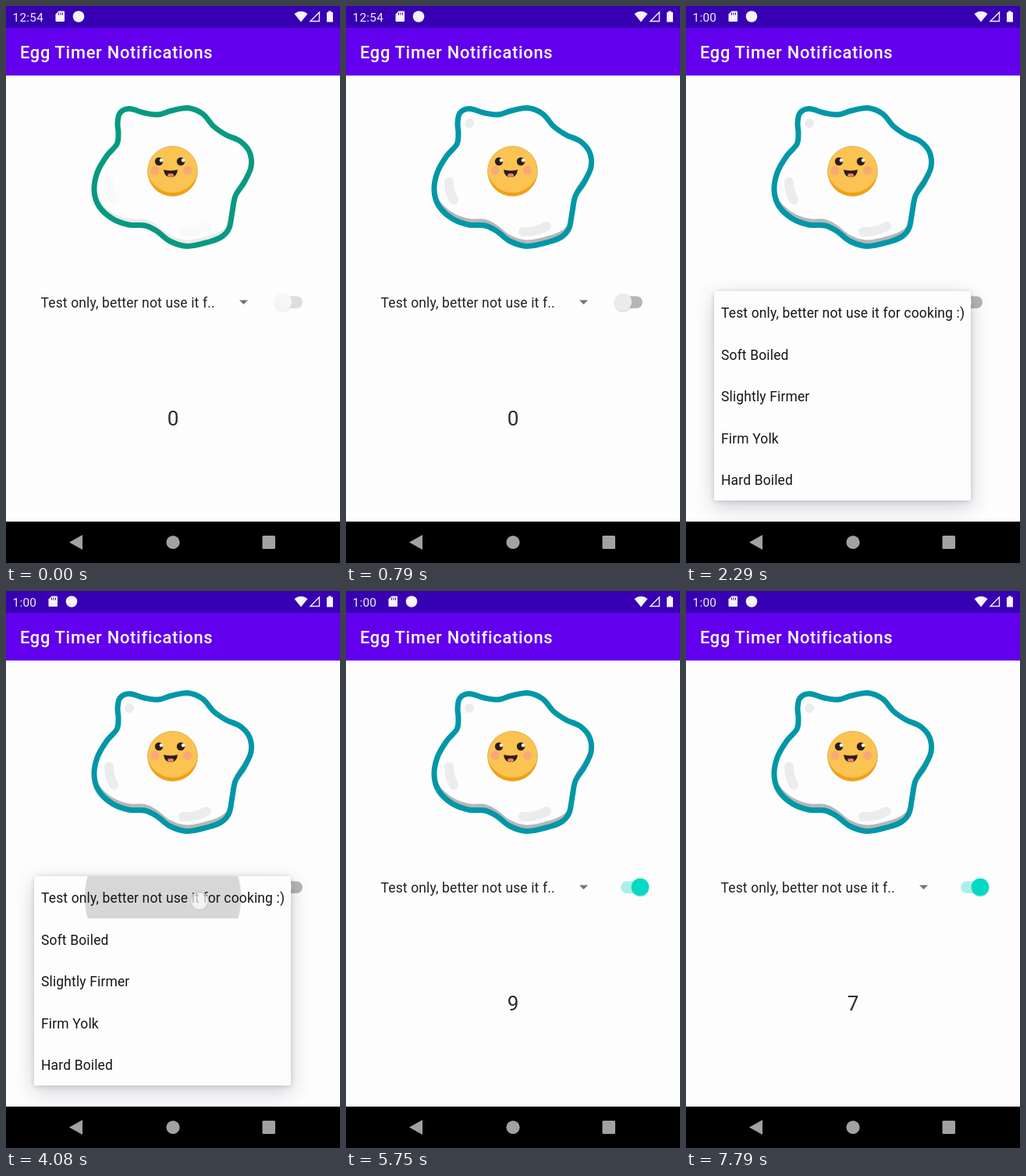
Recreate the animation shown at these times as an HTML page. Size 428 by 713 pixels, loop 8 s.

```html
<!DOCTYPE html>
<html lang="en">
<head>
<meta charset="utf-8">
<title>Egg Timer</title>
<style>
html, body { margin: 0; width: 100%; height: 100%; overflow: hidden; background: #fdfdfd; }
body { position: relative; font-family: Roboto, sans-serif; }
#screen { position: absolute; left: 0; top: 0; display: block; color: #fdfdfd; }
.body { font-size: 17.44px; letter-spacing: .009375em; fill: #212121; }
.clock { font-size: 15.3px; letter-spacing: .02em; fill: #f4f0fa; }
.count { font-size: 26px; text-anchor: middle; fill: #2a2a2a; }
#popup {
  position: absolute; left: 36px; top: 365px; width: 329px; height: 268px;
  background: #fdfdfd; border-radius: 2px; color: #161616;
  box-shadow: 0 8px 26px rgba(50, 50, 85, .22), 0 1px 6px rgba(50, 50, 70, .2);
}
.row { position: relative; height: 53.5px; line-height: 53.5px; overflow: hidden; white-space: nowrap; }
.row span { position: absolute; left: 9px; top: 2px; }
#ripple {
  position: absolute; left: 66.5px; top: -71px; width: 196px; height: 196px;
  border-radius: 50%; background: rgba(0, 0, 0, .15);
}
.touch {
  position: absolute; width: 24px; height: 24px; margin: -12px 0 0 -12px; border-radius: 50%;
  background: rgba(255, 255, 255, .7); box-shadow: inset 0 0 2px 1px rgba(110, 110, 110, .45);
}
</style>
</head>
<body>
<svg id="screen" width="428" height="713" viewBox="0 0 428 713">
  <defs>
    <clipPath id="eggClip"><path class="egg"/></clipPath>
    <clipPath id="yolkClip"><circle cx="213.5" cy="211.5" r="32"/></clipPath>
  </defs>
  <rect width="428" height="713" fill="currentColor"/>

  <rect width="428" height="28" fill="#3700b3"/>
  <rect y="28" width="428" height="61" fill="#6200ee"/>
  <text x="18" y="67" font-size="21.8" font-weight="500" letter-spacing=".75" fill="#fff">Egg Timer Notifications</text>

  <text id="clockA" class="clock" x="8.5" y="19.5">12:54</text>
  <text id="clockB" class="clock" x="8.5" y="19.5">1:00</text>
  <g id="notes" fill="#f6f3fb">
    <path d="M67.5 6.5H74a1 1 0 0 1 1 1V19a1 1 0 0 1-1 1H64.5a1 1 0 0 1-1-1V10.5Z"/>
    <path d="M67.5 8.5v3M70 8.5v3M72.5 8.5v3" stroke="#3700b3"/>
    <circle cx="93" cy="13.5" r="7.3"/>
  </g>
  <g fill="#f6f3fb">
    <path d="M369.5 10Q378 3.5 386.5 10L378 20.5Z"/>
    <path d="M401.5 8V19.5H390Z" fill="none" stroke="#f6f3fb" stroke-width="1.4"/>
    <path d="M413 6.5h4v1.5h2v12.5h-8V8h2Z"/>
  </g>

  <path class="egg" fill="currentColor"/>
  <g id="detail">
    <g clip-path="url(#eggClip)">
      <path class="egg" fill="#b6b6b8"/>
      <path class="egg" fill="currentColor" transform="translate(0 -8)"/>
    </g>
    <g fill="none" stroke="#ebecee" stroke-width="12" stroke-linecap="round">
      <path d="M158 150h.1"/>
      <path d="M132 225Q132 238 138 248"/>
      <path d="M227 289Q242 290 257 282"/>
    </g>
  </g>
  <path id="rim" class="egg" fill="none" stroke="#0097a7" stroke-width="7" stroke-linejoin="round"/>

  <g clip-path="url(#yolkClip)">
    <rect x="180" y="178" width="67" height="67" fill="#f2a00f"/>
    <circle cx="213.5" cy="206" r="33" fill="#fac352"/>
    <g fill="#f9a877"><circle cx="191" cy="210.5" r="5.5"/><circle cx="232.5" cy="210.5" r="5.5"/></g>
  </g>
  <circle cx="213.5" cy="211.5" r="32" fill="none" stroke="#c9a45a" stroke-opacity=".5"/>
  <g fill="#2a1d1a"><circle cx="196" cy="199" r="5.2"/><circle cx="224" cy="199" r="5.2"/></g>
  <g fill="#fff"><circle cx="199" cy="197.5" r="2.3"/><circle cx="227" cy="197.5" r="2.3"/></g>
  <path d="M202 209.5Q211 212 220 209.5Q219 219 211 219Q203 219 202 209.5Z" fill="#2a1d1a"/>
  <ellipse cx="211" cy="216.5" rx="4" ry="2.3" fill="#ec7f6c"/>

  <text class="body" x="44.5" y="385.5">Test only, better not use it f..</text>
  <path d="M299 376.5h11l-5.5 5.5Z" fill="#757575"/>
  <g id="switch">
    <rect id="track" x="352" y="371.5" width="28" height="15.5" rx="7.7" fill="#b5b5b5"/>
    <circle id="halo" cx="355" cy="379" r="21" fill="#03dac5"/>
    <g id="thumb" fill="#ececec">
      <circle cx="355" cy="380" r="11.5" fill="#555" fill-opacity=".22"/>
      <circle id="knob" cx="355" cy="379" r="11.2"/>
    </g>
  </g>

  <text id="n0" class="count" x="214" y="536.5">0</text>
  <text id="n9" class="count" x="214" y="536.5">9</text>
  <text id="n8" class="count" x="214" y="536.5">8</text>
  <text id="n7" class="count" x="214" y="536.5">7</text>

  <rect y="660" width="428" height="53" fill="#000"/>
  <g fill="#a2a2a2">
    <path d="M81 686.5L98 677V696Z"/>
    <circle cx="214" cy="686.5" r="8.6"/>
    <rect x="328.5" y="678" width="16.5" height="17" rx="1.5"/>
  </g>
</svg>

<div id="popup" class="body"></div>
<div id="tapMenu" class="touch" style="left:200px;top:381px"></div>
<div id="tapItem" class="touch" style="left:248px;top:397px"></div>
<div id="tapSwitch" class="touch" style="left:361px;top:381px"></div>

<script>
const LOOP = 8000;
const $ = id => document.getElementById(id);

const rows = ['Test only, better not use it for cooking :)', 'Soft Boiled', 'Slightly Firmer', 'Firm Yolk', 'Hard Boiled'];
$('popup').innerHTML = rows.map((s, i) =>
  `<div class="row">${i ? '' : '<div id="ripple"></div>'}<span>${s}</span></div>`).join('');

// Closed smooth curve through a few points
function blob(p) {
  const n = p.length, at = i => p[(i + n) % n];
  let d = `M${p[0]}`;
  for (let i = 0; i < n; i++) {
    const [a, b, c, e] = [at(i - 1), at(i), at(i + 1), at(i + 2)];
    const c1 = b.map((v, k) => v + (c[k] - a[k]) / 6);
    const c2 = c.map((v, k) => v - (e[k] - b[k]) / 6);
    d += `C${c1} ${c2} ${c}`;
  }
  return d + 'Z';
}
const egg = blob([
  [143, 150], [146, 137], [158, 131.5], [178, 137], [195, 139], [212, 134], [233, 130.5], [252, 138],
  [266, 154], [282, 165], [300, 173], [312, 187], [314, 206], [305, 226], [294, 243], [290, 263],
  [286, 284], [277, 295], [260, 302], [232, 307.5], [210, 301], [193, 288], [178, 281], [157, 280],
  [136, 272], [119, 256], [113, 236], [117, 213], [129, 192], [142, 177], [144, 163]
]);
document.querySelectorAll('.egg').forEach(e => e.setAttribute('d', egg));

// Steps: [ms, value, easing to the next step]
function play(id, prop, steps) {
  const list = [...steps];
  if (list[0][0] > 0) list.unshift([0, list[0][1]]);
  const last = list[list.length - 1];
  if (last[0] < LOOP) list.push([LOOP, last[1]]);
  $(id).animate(
    list.map(([ms, v, easing = 'linear']) => ({ offset: ms / LOOP, [prop]: v, easing })),
    { duration: LOOP, iterations: Infinity });
}
const HOLD = 'steps(1, end)', OUT = 'cubic-bezier(0, 0, .2, 1)', EASE = 'cubic-bezier(.4, 0, .2, 1)';
const show = (id, from, to) => play(id, 'opacity',
  [...(from ? [[0, 0, HOLD]] : []), [from, 1, HOLD], ...(to < LOOP ? [[to, 0, HOLD]] : [])]);

// Picture settles at the start
const settle = (id, prop, a, b) => play(id, prop, [[0, a], [40, a], [250, b]]);
settle('rim', 'stroke', '#079a80', '#0097a7');
settle('detail', 'opacity', .25, 1);
settle('switch', 'opacity', .45, 1);

show('clockA', 0, 1000);
show('clockB', 1000, LOOP);
play('notes', 'transform', [[0, 'translateX(0px)', HOLD], [1000, 'translateX(-9px)']]);

// Menu
show('tapMenu', 1920, 2000);
play('popup', 'opacity', [[2000, 0, OUT], [2200, 1], [4200, 1, EASE], [4440, 0]]);
play('popup', 'clipPath', [[2000, 'inset(0px 0px 230px 0px)', EASE], [2290, 'inset(-40px -40px -40px -40px)']]);
show('tapItem', 4000, 4130);
play('ripple', 'opacity', [[4000, 0], [4040, .7], [4080, 1], [4240, 1], [4440, 0]]);
play('ripple', 'transform', [[4000, 'scale(.3)'], [4080, 'scale(1)', OUT], [4220, 'scale(1.75)']]);

// Switch and countdown
show('tapSwitch', 4960, 5040);
const slide = [[5040, 'translateX(0px)', EASE], [5290, 'translateX(22px)']];
play('thumb', 'transform', slide);
play('halo', 'transform', slide);
play('halo', 'opacity', [[4960, 0], [5060, .16], [5200, .16], [5420, 0]]);
play('knob', 'fill', [[5040, '#ececec'], [5200, '#03dac5']]);
play('track', 'fill', [[5040, '#b5b5b5'], [5200, '#abf0e8']]);
show('n0', 0, 5080);
show('n9', 5080, 6080);
show('n8', 6080, 7080);
show('n7', 7080, LOOP);
</script>
</body>
</html>
```
